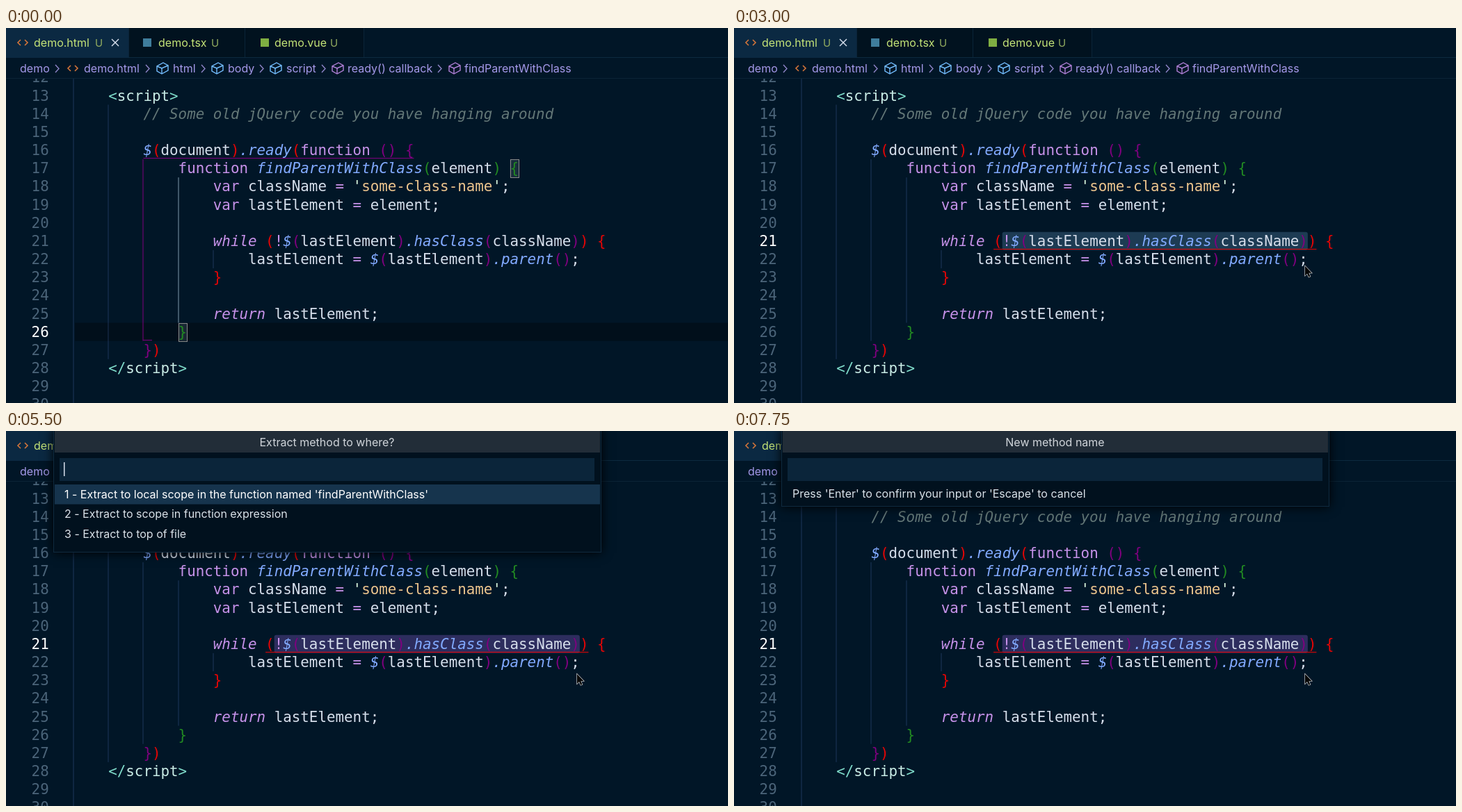
Recreate the animation shown at these times as an HTML page with a canvas. Size 1038 by 540 pixels, loop 8 s.

```html
<!DOCTYPE html>
<html lang="en">
<head>
<meta charset="utf-8">
<title>Extract method demo</title>
<style>
html, body { margin: 0; width: 100%; height: 100%; overflow: hidden; background: #011627; }
canvas { display: block; }
</style>
</head>
<body>
<canvas id="stage" width="1038" height="540"></canvas>
<script>
(() => {
const ctx = document.getElementById('stage').getContext('2d');
const LOOP = 8000, STEP = 250;
const X0 = 97, CW = 12.55, LH = 26.17;
const MONO = '20.85px "DejaVu Sans Mono", monospace';
const UI = 'Inter, sans-serif';
const BG = '#011627', RED = '#e80505', PURPLE = '#800080', GUIDE = 'rgba(94,129,206,.32)';

// Style keys: an upper-case key is set in italics
const COLORS = {
  t: '#7fdbca', g: '#caece6', c: '#637777', f: '#82aaff', k: '#c792ea', w: '#d6deeb',
  s: '#ecc48d', q: '#d9f5dd', r: RED, p: PURPLE, n: '#228b22'
};
const CODE = {
  13: [4, 't<|gscript|t>'],
  14: [8, 'C// Some old jQuery code you have hanging around'],
  16: [8, 'F$|r(|wdocument|r)|F.ready|r(|kfunction |p() {'],
  17: [12, 'kfunction |FfindParentWithClass|n(|welement|n) {'],
  18: [16, "kvar |wclassName |k= |q'|ssome-class-name|q'|w;"],
  19: [16, 'kvar |wlastElement |k= |welement;'],
  21: [16, 'Kwhile |r(|k!|F$|p(|wlastElement|p)|F.hasClass|p(|wclassName|p)|r) {'],
  22: [20, 'wlastElement |k= |F$|p(|wlastElement|p)|F.parent|p()|w;'],
  23: [16, 'r}'],
  25: [16, 'Kreturn |wlastElement;'],
  26: [12, 'n}'],
  27: [8, 'p}|r)'],
  28: [4, 't</|gscript|t>']
};

const MOUSE = [
  [250, 700, 425], [500, 610, 398], [750, 500, 355], [1000, 410, 322], [1250, 385, 310],
  [1500, 440, 312], [2000, 780, 320], [2250, 843, 324], [2500, 821, 328], [3250, 821, 350]
];
const CARET = [[1250, 23], [1500, 28], [2000, 54], [2250, 58]];

function track(keys, t) {
  if (t <= keys[0][0]) return keys[0].slice(1);
  for (let i = 1; i < keys.length; i++) {
    const a = keys[i - 1], b = keys[i];
    if (t <= b[0]) {
      const p = (t - a[0]) / (b[0] - a[0]);
      return a.slice(1).map((v, j) => v + (b[j + 1] - v) * p);
    }
  }
  return keys[keys.length - 1].slice(1);
}

const colX = col => X0 + col * CW;
const lineY = line => 84.3 + LH * (line - 13);

function rect(x, y, w, h, color) {
  ctx.fillStyle = color;
  ctx.fillRect(x, y, w, h);
}

function poly(points, color, width = 1.4, close = false) {
  ctx.beginPath();
  points.forEach(([x, y]) => ctx.lineTo(x, y));
  if (close) ctx.closePath();
  ctx.strokeStyle = color;
  ctx.lineWidth = width;
  ctx.stroke();
}

function label(text, x, y, color, size = 16, align = 'left') {
  ctx.font = `${size}px ${UI}`;
  ctx.textAlign = align;
  ctx.fillStyle = color;
  ctx.fillText(text, x, y + 5.7);
  ctx.textAlign = 'left';
}

function angles(x, y) {
  poly([[x - 3, y - 4], [x - 7, y], [x - 3, y + 4]], '#d5763a', 1.6);
  poly([[x + 3, y - 4], [x + 7, y], [x + 3, y + 4]], '#d5763a', 1.6);
}

function cube(x, y, color) {
  poly([[x + 1, y - 8], [x + 8, y - 4], [x + 8, y + 3], [x - 1, y + 8], [x - 8, y + 4], [x - 8, y - 3]], color, 1.4, true);
  poly([[x - 8, y - 3], [x - 1, y], [x + 8, y - 4]], color);
  poly([[x - 1, y], [x - 1, y + 8]], color);
}

function drawTabs() {
  rect(0, 0, 1038, 43, BG);
  rect(0, 0, 176, 43, '#0b2942');
  rect(177, 0, 338, 43, '#01121f');
  [176, 343, 514].forEach(x => rect(x, 0, 1, 43, '#0a2438'));
  rect(176, 42, 862, 1, '#0d2a3f');
  [['demo.html', 40, 128], ['demo.tsx', 219, 295], ['demo.vue', 386, 466]].forEach(([name, x, u]) => {
    label(name, x, 21, '#c5e478');
    label('U', u, 21, '#93ad60', 15);
  });
  angles(24, 21);
  rect(197, 15, 12, 12, '#3f7d9c');
  rect(366, 15, 12, 12, '#7fae42');
  poly([[152, 16], [162, 26]], '#d6deeb');
  poly([[162, 16], [152, 26]], '#d6deeb');
}

function drawBreadcrumbs() {
  rect(0, 43, 1038, 29, BG);
  rect(0, 72, 1038, 1, '#0c2436');
  const parts = [['demo', 20], ['demo.html', 112], ['html', 240], ['body', 319], ['script', 403],
    ['ready() callback', 491], ['findParentWithClass', 659]];
  parts.forEach(([text, x]) => label(text, x, 58, '#a599e9'));
  [74, 204, 284, 368, 457, 624].forEach(x => poly([[x - 3, 53], [x + 2, 58.5], [x - 3, 64]], '#8f86c9'));
  angles(96, 58);
  [225, 304, 388].forEach(x => cube(x, 58, '#75beff'));
  [477, 645].forEach(x => cube(x, 58, '#b180d7'));
}

function drawGuides(t) {
  const line = (col, from, to, color = GUIDE) =>
    rect(Math.round(colX(col)) - 0.5, lineY(from), 1, (to - from + 1) * LH, color);
  const active = '#7e97ac';
  line(0, 12, 30);
  line(4, 14, 27);
  line(8, 17, 26, t < 1250 ? PURPLE : GUIDE);
  line(12, 18, 25, t < 1250 ? active : GUIDE);
  line(16, 22, 22, t === 1250 ? active : GUIDE);
}

function drawCode(current) {
  for (let n = 12; n <= 30; n++) {
    const y = lineY(n) + 20.3;
    ctx.font = MONO;
    ctx.fillStyle = n === current ? '#fff' : '#4b6479';
    ctx.fillText(n, 36.6, y);
    if (!CODE[n]) continue;
    let [col, tokens] = CODE[n];
    for (const token of tokens.split('|')) {
      const key = token[0], body = token.slice(1), low = key.toLowerCase();
      ctx.font = (key !== low ? 'italic ' : '') + MONO;
      ctx.fillStyle = COLORS[low];
      ctx.fillText(body, colX(col), y);
      col += body.length;
    }
  }
}

function bracketBox(line, col) {
  rect(colX(col), lineY(line), CW, LH, 'rgba(120,140,150,.2)');
  ctx.strokeStyle = '#888';
  ctx.lineWidth = 1;
  ctx.strokeRect(Math.round(colX(col)) + 0.5, Math.round(lineY(line)) + 0.5, 12, 26);
}

function underline(line, from, to, color) {
  rect(colX(from), Math.round(lineY(line) + LH) - 2, (to - from) * CW, 1, color);
}

function drawEditor(t) {
  const clicked = t >= 1250, current = clicked ? 21 : 26;
  const col = clicked ? Math.round(track(CARET, t)[0]) : 13;
  ctx.save();
  ctx.beginPath();
  ctx.rect(0, 73, 1038, 467);
  ctx.clip();
  if (t <= 1250) rect(99, lineY(current), 939, LH, '#010f1b');
  if (col > 23) {
    ctx.beginPath();
    ctx.roundRect(colX(23), lineY(21), (col - 23) * CW, LH, 3);
    ctx.fillStyle = t < 4500 ? '#1d3b53' : '#2d2d5e';
    ctx.fill();
  }
  if (!clicked) {
    bracketBox(17, 50);
    bracketBox(26, 12);
  } else if (t < 2500) {
    bracketBox(21, 22);
    bracketBox(21, 58);
  }
  drawGuides(t);
  drawCode(current);
  if (!clicked) {
    underline(16, 8, 39, PURPLE);
    underline(26, 8, 9, PURPLE);
  } else {
    const inner = [[25, 37], [47, 57]].find(([a, b]) => col > a && col <= b);
    if (inner) underline(21, inner[0], inner[1] + 1, PURPLE);
    else underline(21, 22, 59, RED);
  }
  const on = t < 1250 ? t >= 250 && t < 750
    : t < 2750 || t < 4500 && Math.floor((t - 2750) / 500) % 2 === 1;
  if (on) rect(Math.round(colX(col)) - 1, lineY(current), 2, LH, '#a9c4d4');
  ctx.restore();
}

function panel(title, height, caret) {
  ctx.save();
  ctx.shadowColor = '#000';
  ctx.shadowBlur = 15;
  rect(68, -4, 788, height + 4, '#01111e');
  ctx.restore();
  ctx.strokeStyle = '#0f2a3f';
  ctx.lineWidth = 1;
  ctx.strokeRect(68.5, -4.5, 787, height + 4);
  rect(70, 0, 784, 31, '#222d38');
  rect(77, 39, 769, 33, '#0b253a');
  label(title, 461.5, 16, '#d0d5da', 16, 'center');
  if (caret) rect(83, 45, 1.5, 20, '#d6deeb');
}

function drawDialog(t) {
  if (t < 4500) return;
  if (t < 7250) {
    panel('Extract method to where?', 175, Math.floor((t - 4500) / 500) % 2 === 0);
    const picked = t < 5750 ? 0 : 1;
    rect(70, 77 + picked * 28.5, 784, 28.5, '#16344d');
    ["1 - Extract to local scope in the function named 'findParentWithClass'",
      '2 - Extract to scope in function expression',
      '3 - Extract to top of file'
    ].forEach((row, i) => label(row, 84, 91 + i * 28.5, i === picked ? '#fff' : '#dbe1e8'));
  } else {
    panel('New method name', 109, t < 7750);
    label("Press 'Enter' to confirm your input or 'Escape' to cancel", 84, 90, '#dbe1e8');
  }
}

function drawMouse(t) {
  if (t < 250) return;
  const [x, y] = track(MOUSE, t);
  const shape = [[0, 0], [0, 14], [3, 11], [5.3, 16], [7.5, 15], [5.4, 10.2], [9.6, 10]];
  ctx.fillStyle = '#080808';
  poly(shape.map(([dx, dy]) => [x + dx, y + dy]), '#e8e8e8', 1.2, true);
  ctx.fill();
}

function draw() {
  const t = Math.floor(performance.now() % LOOP / STEP) * STEP;
  rect(0, 0, 1038, 540, BG);
  drawEditor(t);
  drawTabs();
  drawBreadcrumbs();
  drawDialog(t);
  drawMouse(t);
  requestAnimationFrame(draw);
}
draw();
})();
</script>
</body>
</html>
```
